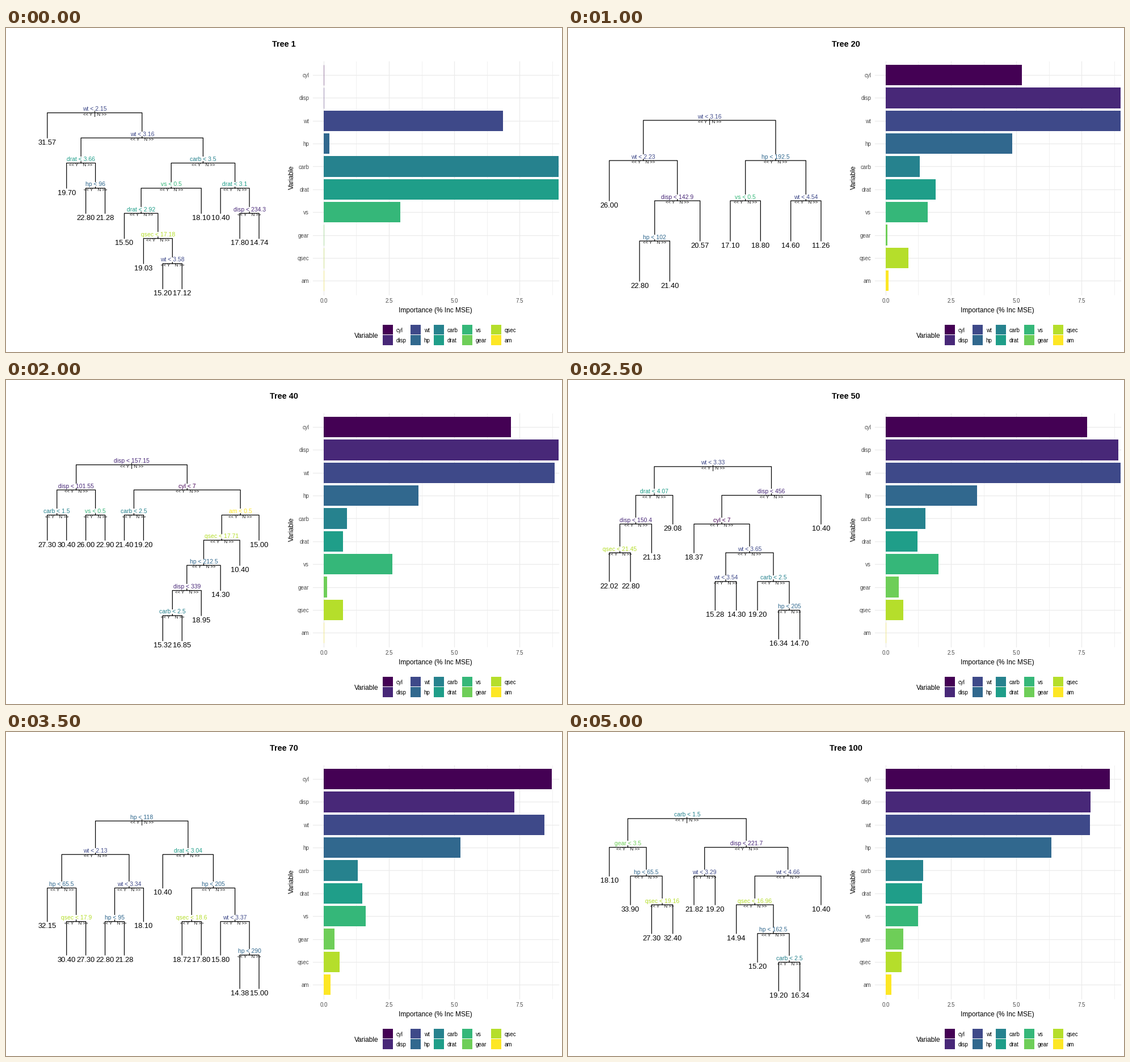
A matplotlib script for the animation above (5500 ms loop, 980 by 572 pixels).

```python
import matplotlib.pyplot as plt
import numpy as np
from matplotlib.animation import FuncAnimation
from matplotlib.patches import Rectangle

W, H, DPI = 980, 572, 100
plt.rcParams["font.family"] = "Liberation Sans"

VARS = ["cyl", "disp", "wt", "hp", "carb", "drat", "vs", "gear", "qsec", "am"]
COLORS = dict(zip(VARS, plt.cm.viridis(np.linspace(0, 1, len(VARS)))))

# Tree number, importance per variable, tree in preorder (left branch first)
STEPS = [
    (1, [0, 0, 6.87, .22, 10, 10, 2.94, 0, 0, 0],
     "wt<2.15 31.57 wt<3.16 drat<3.66 19.70 hp<96 22.80 21.28 carb<3.5 vs<0.5 "
     "drat<2.92 15.50 qsec<17.18 19.03 wt<3.58 15.20 17.12 18.10 "
     "drat<3.1 10.40 disp<234.3 17.80 14.74"),
    (10, [3.1, 7.2, 10, 2.4, 3.3, 4.1, 2.2, 0, .5, .05],
     "cyl<5 wt<2.26 31.10 hp<95 24.40 22.15 disp<266.9 qsec<18.15 19.70 "
     "wt<3.44 17.80 18.95 hp<222.5 wt<3.81 15.20 16.63 13.30"),
    (20, [5.21, 10, 10, 4.85, 1.3, 1.92, 1.6, .065, .87, .1],
     "wt<3.16 wt<2.23 26.00 disp<142.9 hp<102 22.80 21.40 20.57 "
     "hp<192.5 vs<0.5 17.10 18.80 wt<4.54 14.60 11.26"),
    (30, [6.3, 8.9, 10, 4.2, 1.1, 1.3, 2.1, .1, .8, .05],
     "disp<153.35 wt<1.99 32.23 hp<92 25.30 21.45 hp<192.5 drat<3.12 "
     "wt<3.33 18.90 17.60 20.07 wt<4.66 qsec<17.51 14.50 15.35 10.40"),
    (40, [7.16, 10, 8.85, 3.63, .89, .74, 2.64, .14, .74, 0],
     "disp<157.15 disp<101.55 carb<1.5 27.30 30.40 vs<0.5 26.00 22.90 "
     "cyl<7 carb<2.5 21.40 19.20 am<0.5 qsec<17.71 hp<212.5 disp<339 "
     "carb<2.5 15.32 16.85 18.95 14.30 10.40 15.00"),
    (50, [7.71, 8.9, 10, 3.49, 1.52, 1.22, 2.03, .5, .68, 0],
     "wt<3.33 drat<4.07 disp<150.4 qsec<21.45 22.02 22.80 21.13 29.08 "
     "disp<456 cyl<7 18.37 wt<3.65 wt<3.54 15.28 14.30 carb<2.5 19.20 "
     "hp<205 16.34 14.70 10.40"),
    (60, [8.3, 8.1, 8.7, 4.4, 1.4, 1.35, 1.8, .45, .65, .15],
     "wt<2.54 hp<78.5 31.40 disp<120.55 27.15 24.40 cyl<7 drat<3.81 18.65 "
     "21.00 disp<420 qsec<17.35 14.85 carb<2.5 16.90 15.50 10.40"),
    (70, [8.74, 7.3, 8.45, 5.245, 1.3, 1.48, 1.61, .42, .6, .26],
     "hp<118 wt<2.13 hp<65.5 32.15 qsec<17.9 30.40 27.30 wt<3.34 hp<95 22.80 "
     "21.28 18.10 drat<3.04 10.40 hp<205 qsec<18.6 18.72 17.80 wt<3.37 15.80 "
     "hp<290 14.38 15.00"),
    (80, [10, 7.6, 8, 5.5, 1.4, 1.3, 1.45, .5, .6, .27],
     "cyl<5 disp<87.05 31.35 wt<2.39 26.00 22.80 hp<196.5 wt<3.48 20.42 "
     "vs<0.5 16.87 18.10 drat<3.18 wt<4.2 15.20 12.85 16.10"),
    (90, [8.67, 7.99, 7.36, 5.91, 1.52, 1.16, 1.325, .565, .576, .26],
     "disp<163.8 hp<92 26.82 disp<142.9 22.26 20.35 qsec<17.71 drat<3.15 17.32 "
     "wt<3.37 15.80 carb<6 14.50 15.00 qsec<18.14 10.40 18.50"),
    (100, [8.58, 7.84, 7.81, 6.34, 1.43, 1.39, 1.25, .67, .62, .22],
     "carb<1.5 gear<3.5 18.10 hp<65.5 33.90 qsec<19.16 27.30 32.40 "
     "disp<221.7 wt<3.29 21.82 19.20 wt<4.66 qsec<16.96 14.94 hp<162.5 15.20 "
     "carb<2.5 19.20 16.34 10.40"),
]

# Chart panel, in pixels
LEFT, RIGHT, TOP, BOTTOM = 541, 974, 58.8, 470.5
ZERO, UNIT = 559.9, 46.05
ROW0, ROW = 83, 40.37
BAR = 0.9 * ROW

fig = plt.figure(figsize=(W / DPI, H / DPI), dpi=DPI, facecolor="white")
ax = fig.add_axes([0, 0, 1, 1])
ax.set(xlim=(0, W), ylim=(H, 0))
ax.axis("off")
live = []


def text(x, y, s, px, color="black", ha="center", z=5, **kw):
    """Text of a pixel size, its capitals centred on y."""
    if not kw.get("rotation"):
        y, kw["va"] = y + 0.36 * px, "baseline"
    return ax.text(x, y, s, fontsize=px * 72 / DPI, color=color, ha=ha,
                   zorder=z, **kw)


def line(xs, ys, color, px, z, **kw):
    return ax.plot(xs, ys, color=color, lw=px * 72 / DPI, zorder=z,
                   solid_joinstyle="round", **kw)[0]


def box(x, y, w, h, color, z):
    return ax.add_patch(Rectangle((x, y), w, h, fc=color, lw=0, zorder=z))


def draw_chart_frame():
    for k in range(8):
        x = ZERO + 1.25 * k * UNIT
        minor = k % 2
        line([x, x], [TOP, BOTTOM], "#ebebeb", 0.7 if minor else 1.3, 0)
        if not minor:
            text(x, 481.5, f"{1.25 * k:.1f}", 9.8, "#4d4d4d")
    for k, name in enumerate(VARS):
        y = ROW0 + k * ROW
        line([LEFT, RIGHT], [y, y], "#ebebeb", 1.3, 0)
        text(534, y + 0.5, name, 9.8, "#4d4d4d", "right")
    text(757, 497.5, "Importance (% Inc MSE)", 11.9)
    text(503.5, 264, "Variable", 11.9, rotation=90, va="center")

    text(614, 542.8, "Variable", 11.9, ha="left")
    for k, name in enumerate(VARS):
        x = (664.3, 713, 754.3, 804.3, 855)[k // 2]
        y = 523.5 + 18.7 * (k % 2)
        box(x, y, 17.7, 17.7, COLORS[name], 2)
        text(x + 23.7, y + 9.5, name, 9.8, ha="left")


def parse(tokens, depth=0):
    label = next(tokens)
    kids = [parse(tokens, depth + 1) for _ in "LR"] if "<" in label else []
    return dict(label=label, depth=depth, kids=kids)


def leaves(node):
    return sum(map(leaves, node["kids"]), []) if node["kids"] else [node]


def draw_node(node, y_of):
    y = y_of(node["depth"])
    if not node["kids"]:
        live.append(text(node["x"], y + 7.2, node["label"], 12.9))
        return
    a, b = node["kids"]
    for kid in (a, b):
        draw_node(kid, y_of)
    x = node["x"] = (a["x"] + b["x"]) / 2
    yk = y_of(a["depth"])
    name, cut = node["label"].split("<")
    live.extend([
        line([a["x"], a["x"], b["x"], b["x"]], [yk, y, y, yk], "black", 1.25, 1,
             snap=False),
        box(x - 10, y - 11.1, 20, 7.8, "white", 2),
        text(x, y - 7.2, f"{name} < {cut}", 10.4, COLORS[name]),
        text(x, y + 2.4, "<< Y    N >>", 7.8),
    ])
    if node["depth"] == 0:
        live.append(text(x, y, "|", 12.9, z=1.5))


def draw_tree(spec):
    root = parse(iter(spec.split()))
    ends = leaves(root)
    for leaf, x in zip(ends, np.linspace(72.8, 446, len(ends))):
        leaf["x"] = x
    depth = max(leaf["depth"] for leaf in ends)
    step = 355 / (depth + 1)
    draw_node(root, lambda d: 305 + step * (d - depth / 2))


def draw_bars(values):
    for k, (name, v) in enumerate(zip(VARS, values)):
        y = ROW0 + k * ROW - BAR / 2
        if v:
            w = min(v * UNIT, RIGHT - ZERO)
            live.append(box(ZERO, y, w, BAR, COLORS[name], 2))
        else:
            live.append(line([ZERO, ZERO], [y, y + BAR], COLORS[name], 1, 2,
                             alpha=0.45, solid_capstyle="butt"))


def update(i):
    for artist in live:
        artist.remove()
    live.clear()
    number, values, spec = STEPS[i]
    live.append(text(490, 27.6, f"Tree {number}", 14.4, weight="bold"))
    draw_tree(spec)
    draw_bars(values)
    return live


draw_chart_frame()
anim = FuncAnimation(fig, update, frames=len(STEPS), interval=500,
                     init_func=lambda: update(0), repeat=True, repeat_delay=0,
                     blit=False)
plt.show()
```
